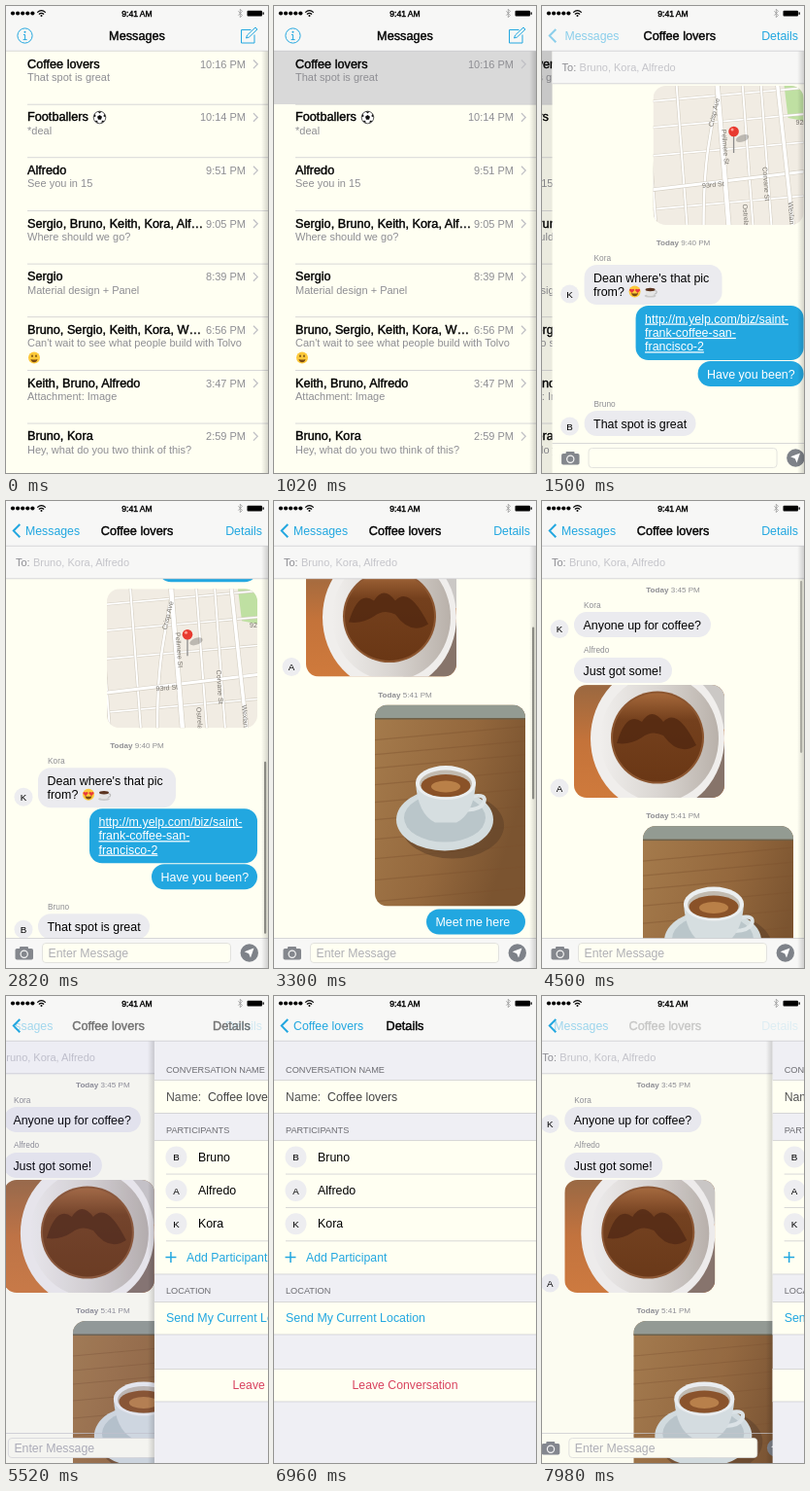
Recreate the animation shown at these times as an HTML page. Size 270 px wide and 480 px high, loop 8000 ms.

```html
<!DOCTYPE html>
<html lang="en">
<head>
<meta charset="utf-8">
<title>Messages</title>
<style>
  html, body { margin: 0; width: 100%; height: 100%; overflow: hidden; background: #fffff2; }
  svg { display: block; width: 100vw; height: 100vh; font-family: "Liberation Sans", Arial, sans-serif; }
  text { white-space: pre; }
</style>
</head>
<body>
<svg id="stage" viewBox="0 0 270 480"></svg>
<script>
const BLUE = '#22a7e0', GRAY = '#8e8e93', LINE = '#c8c7cc', CREAM = '#fffff2', BAR = '#f7f7f6';
const LOOP = 8000, PUSH = 1190, OPEN = 5430, BACK = 7755, BOTTOM = 495;

// ---- drawing helpers -------------------------------------------------
const text = (x, y, s, size = 12.3, fill = '#000', more = '') =>
  `<text x="${x}" y="${y}" font-size="${size}" fill="${fill}" ${more}>${s}</text>`;
const medium = (x, y, s, size = 12.7, more = '') =>
  text(x, y, s, size, '#000', `stroke="#000" stroke-width=".4" ${more}`);
const rect = (x, y, w, h, fill, more = '') =>
  `<rect x="${x}" y="${y}" width="${w}" height="${h}" fill="${fill}" ${more}/>`;
const circle = (x, y, r, fill, more = '') => `<circle cx="${x}" cy="${y}" r="${r}" fill="${fill}" ${more}/>`;
const oval = (x, y, rx, ry, fill, more = '') =>
  `<ellipse cx="${x}" cy="${y}" rx="${rx}" ry="${ry}" fill="${fill}" ${more}/>`;
const path = (d, stroke, w = 1, more = '') =>
  `<path d="${d}" fill="none" stroke="${stroke}" stroke-width="${w}" ${more}/>`;
const shape = (d, fill, more = '') => `<path d="${d}" fill="${fill}" ${more}/>`;
const group = (id, body, more = '') => `<g id="${id}" ${more}>${body}</g>`;
const rule = (y, x = 0) => rect(x, y, 270 - x, .7, LINE);
const gradient = (id, vector, stops) => `<linearGradient id="${id}" ${vector}>` +
  stops.map(([at, color, a = 1]) => `<stop offset="${at}" stop-color="${color}" stop-opacity="${a}"/>`).join('') +
  '</linearGradient>';
const MID = 'text-anchor="middle"', END = 'text-anchor="end"', DOWN = 'x2="0" y2="1"';

const face = (x, y, hearts) => circle(x, y, 6, '#fdc93a') +
  (hearts
    ? [-3, 3].map(d => shape(`M${x + d} ${y + 1.5}l-2.6-2.8q0-2.4 2.6-1 2.6-1.4 2.6 1z`, '#e8383d')).join('')
    : oval(x - 2, y - 1.8, .8, 1.3, '#6b4410') + oval(x + 2, y - 1.8, .8, 1.3, '#6b4410')) +
  shape(`M${x - 3.5} ${y + 1.5}q3.5 1 7 0-.8 3.2-3.5 3.2t-3.5-3.2z`, '#7a4a12');

const cupIcon = (x, y) => oval(x, y + 4.5, 6, 1.6, '#c9c9c9') +
  path(`M${x + 4} ${y - 1}q4 0 2 3l-3 1`, '#bbb', 1.2) +
  shape(`M${x - 5} ${y - 2}h10q0 6-3 6.5h-4q-3-.5-3-6.5z`, '#e4e4e4') + oval(x, y - 2, 5, 1.7, '#5b3420');

const ball = (x, y) => circle(x, y, 6.3, '#fff', 'stroke="#333" stroke-width=".8"') +
  shape(`M${x} ${y - 2.6}l2.5 1.8-1 3h-3l-1-3z`, '#111') +
  [0, 72, 144, 216, 288].map(a =>
    shape(`M${x - 2} ${y - 5.9}h4l-2 1.9z`, '#111', `transform="rotate(${a} ${x} ${y})"`)).join('');

// ---- conversation list -----------------------------------------------
const rows = [
  ['Coffee lovers', 'That spot is great', '10:16 PM'],
  ['Footballers', '*deal', '10:14 PM'],
  ['Alfredo', 'See you in 15', '9:51 PM'],
  ['Sergio, Bruno, Keith, Kora, Alf…', 'Where should we go?', '9:05 PM'],
  ['Sergio', 'Material design + Panel', '8:39 PM'],
  ['Bruno, Sergio, Keith, Kora, W…', "Can't wait to see what people build with Tolvo", '6:56 PM'],
  ['Keith, Bruno, Alfredo', 'Attachment: Image', '3:47 PM'],
  ['Bruno, Kora', 'Hey, what do you two think of this?', '2:59 PM']
];
const listPage = rect(0, 0, 270, 480, CREAM) +
  rect(0, 46, 270, 55, '#d9d9d9', 'id="press"') +
  rows.map(([name, last, time], i) => {
    const y = 46.5 + i * 54.65;
    return medium(22, y + 17.3, name) + text(22, y + 30.5, last, 11, GRAY) +
      text(247, y + 17.2, time, 11, GRAY, END) +
      path(`M255 ${y + 9}l4.2 4.3-4.2 4.3`, '#c0c0c5', 1.3) + rule(y + 54.3, 22);
  }).join('') + ball(96.5, 114.5) + face(29, 361.5);

// ---- chat ------------------------------------------------------------
const bubble = (x, y, w, lines, mine, more = '') =>
  rect(x, y, w, 11 + 15 * lines.length, mine ? BLUE : '#ebebef', 'rx="13"') +
  lines.map((s, i) => text(x + 9.5, y + 17.5 + i * 14.4, s, 12.45, mine ? '#fff' : '#000', more)).join('');
const avatar = (x, y, s, r = 9.5) => circle(x, y, r, '#ededf0') + text(x, y + 3.6, s, 9.8, '#000', MID);
const sender = (y, s) => text(43, y + 3, s, 8.3, GRAY);
const stamp = (y, s) => text(135, y + 3, `<tspan font-weight="bold">Today</tspan> ${s}`, 8.1, GRAY, MID);
const picture = (id, x, y, w, h, body) =>
  `<clipPath id="${id}">${rect(0, 0, w, h, '#000', 'rx="13"')}</clipPath>` +
  `<g transform="translate(${x} ${y})" clip-path="url(#${id})">${body}</g>`;

const topCup = gradient('table', DOWN, [[0, '#9a6840'], [.5, '#c4733a'], [1, '#cf7a3c']]) +
  gradient('china', 'x2="1" y2="0"', [[0, '#f0eeec'], [.5, '#d9d5d1'], [1, '#b9b1aa']]) +
  gradient('crema', DOWN, [[0, '#a5683a'], [.3, '#74401d'], [1, '#6a3715']]) +
  rect(0, 0, 155, 116, 'url(#table)') + shape('M100 116L155 60V116z', '#87746a') +
  shape('M90 0H155V46z', '#cbc8c5') +
  oval(86, 55, 69, 75, '#f0eeec') + oval(88, 55, 61, 65, 'url(#china)') +
  oval(86, 54, 48, 47.5, '#8c5630') + oval(86, 54, 46, 45.5, 'url(#crema)') +
  shape('M44 60Q54 26 70 38 80 22 92 38 106 22 126 62 108 74 92 52 80 46 70 54 58 62 44 60z', '#4f260f', 'opacity=".75"');

const sideCup = gradient('wood', 'x2="1" y2=".4"', [[0, '#a57b4c'], [.6, '#94683d'], [1, '#7b5430']]) +
  rect(0, 0, 155, 207, 'url(#wood)') + rect(0, 0, 155, 14, '#939b92') + rect(0, 13.5, 155, 1.5, '#6d6048') +
  [28, 43, 57, 74, 92, 110, 130, 150, 172, 194].map(y =>
    path(`M0 ${y + 8}L155 ${y - 6}`, '#7c522d', 1.2, 'opacity=".4"')).join('') +
  oval(80, 124, 53, 34, '#5f4228', 'opacity=".6"') + oval(72, 118, 50, 32, '#d3dcde') +
  oval(72, 116, 42, 25, '#bac6ca') + path('M100 94q16-3 12 7-3 6-17 7', '#dde4e6', 4) +
  shape('M42 80Q44 112 62 121H84Q102 112 104 80z', '#d6dee0') + oval(73, 80, 31, 17.5, '#eceff0') +
  oval(73, 81, 27, 14, '#c2bbb0') + oval(73, 83, 25.5, 11.5, '#8a5228') + oval(73, 84, 15, 6, '#b98048');

const road = (d, w) => path(d, '#d5cfc3', w + 1.2) + path(d, '#fff', w);
const label = (x, y, turn, s) =>
  text(0, 0, s, 7, '#77736c', `${MID} transform="translate(${x} ${y}) rotate(${turn})"`);
const map = rect(0, 0, 155, 143, '#f1ece3') + shape('M135 0H155V36L139 33z', '#bfe0a2') +
  [22, 49, 78, 133].map(y => road(`M-2 ${y - 6}L157 ${y - 20}`, 1.6)).join('') +
  [-8, 24, 92, 111].map(x => road(`M${x} -2L${x + 11} 145`, 2)).join('') +
  road('M68 -2Q62 30 57 62T52 145', 2.4) + road('M-2 107L157 88', 3) +
  road('M66 -2L78 145', 4.5) + road('M128 -2L144 145', 3.5) +
  label(65, 28, -76, 'Crisp Ave') + label(72, 63, 85, 'Pellmere St') + label(62, 104, -5, '93rd St') +
  label(114, 101, 86, 'Corvane St') + label(93, 133, 86, 'Ostrela') + label(140, 131, 86, 'Wexlan') +
  text(147, 40, '92nd', 7, '#77736c') +
  oval(92, 54, 7, 3.5, '#000', 'opacity=".22" transform="rotate(-20 92 54)"') +
  path('M83 50V69', '#8b8b8b', 1.3) + circle(83, 47, 5.3, '#e83a30') + circle(81.5, 45, 1.5, '#ff9d92');

const LINK = 'text-decoration="underline"';
const thread = stamp(91, '3:45 PM') + sender(107, 'Kora') + avatar(18, 131.5, 'K') +
  bubble(33, 114, 141, ['Anyone up for coffee?']) +
  sender(153, 'Alfredo') + bubble(33, 161, 101, ['Just got some!']) +
  picture('c1', 33, 189, 155, 116, topCup) + avatar(18, 295, 'A') +
  stamp(323, '5:41 PM') + picture('c2', 104, 334, 155, 207, sideCup) +
  bubble(157, 544, 102, ['Meet me here'], true) + picture('c3', 104, 577, 155, 143, map) +
  stamp(738, '9:40 PM') + sender(754, 'Kora') + avatar(18, 791, 'K') +
  bubble(33, 761, 142, ["Dean where's that pic", 'from?']) + face(85, 788.5, true) + cupIcon(101, 788.5) +
  bubble(86, 803, 173, ['http://m.yelp.com/biz/saint-', 'frank-coffee-san-', 'francisco-2'], true, LINK) +
  bubble(150, 860, 109, ['Have you been?'], true) +
  sender(904, 'Bruno') + avatar(18, 927, 'B') + bubble(33, 911, 115, ['That spot is great']);

const CAMERA = '#84878d';
const camera = rect(9.5, 460, 18.5, 11.5, CAMERA, 'rx="1.8"') + rect(14, 458, 9, 4, CAMERA, 'rx="1"') +
  circle(18.7, 465.7, 4.2, BAR) + circle(18.7, 465.7, 3, CAMERA);
const chatPage = rect(0, 0, 270, 480, CREAM) + group('thread', thread) +
  rect(266, 0, 2.2, 0, '#000', 'id="scroller" rx="1.1" opacity=".4"') +
  rect(0, 46, 270, 34, BAR) + rule(79.5) +
  text(10, 67, 'To:', 11, GRAY) + text(28, 67, 'Bruno, Kora, Alfredo', 11, '#c5c5ca') +
  group('inputBar', rect(0, 449.5, 270, 31, BAR)) + rule(449.3) + camera +
  rect(37.5, 454.5, 194, 20, CREAM, 'rx="3.5" stroke="#dcdcda" stroke-width=".8"') +
  text(43.5, 469, 'Enter Message', 12.3, '#b0b0b5', 'id="hint"') +
  circle(250.8, 464.5, 9.2, '#7e8289') + shape('M255.5 459.5L252 469.5 250.2 465.2 245.6 463.3z', '#fff');

// ---- details ---------------------------------------------------------
const cell = (y, h) => rect(0, y, 270, h, CREAM) + rule(y) + rule(y + h - .4);
const heading = (y, s) => text(12, y + 3.3, s, 9.2, '#6d6d72');
const detailsPage = gradient('edgeShade', 'x2="1" y2="0"', [[0, '#000', 0], [1, '#000', .16]]) +
  rect(-7, 0, 7, 480, 'url(#edgeShade)') + rect(0, 0, 270, 480, '#efeff4') +
  heading(76, 'CONVERSATION NAME') + cell(86, 34.5) +
  text(12, 107.5, 'Name:', 12.3, '#555') + text(55, 107.5, 'Coffee lovers', 12.3, '#444') +
  heading(138, 'PARTICIPANTS') + cell(148, 138) +
  ['Bruno', 'Alfredo', 'Kora'].map((s, i) => {
    const y = 165.5 + i * 34.4;
    return avatar(22.5, y, s[0], 11) + text(45, y + 4, s, 12.4) + rule(y + 17.2, 12);
  }).join('') +
  path('M11.5 268.5h11M17 263v11', BLUE, 1.5) + text(33, 273, 'Add Participant', 12.3, BLUE) +
  heading(303, 'LOCATION') + cell(314, 34) + text(12, 335, 'Send My Current Location', 12.4, BLUE) +
  cell(383, 34) + text(135, 404, 'Leave Conversation', 12.25, '#d9435f', MID);

// ---- bars ------------------------------------------------------------
const status = [0, 1, 2, 3, 4].map(i => circle(7 + i * 5.1, 7.5, 2.1, '#000')).join('') +
  path('M32.2 6.6q4.3-3.8 8.6 0M33.9 8.5q2.6-2.2 5.2 0', '#000', 1.2) + circle(36.5, 10, 1, '#000') +
  medium(135, 10.7, '9:41 AM', 8.6, MID) +
  path('M239.3 5.3l4.2 4.2-2.2 2.2V3.2l2.2 2.2-4.2 4.2', '#9a9a9a', .8) +
  rect(248.5, 4.7, 15.5, 5.8, '#000', 'rx="1"') + rect(264.5, 6.4, 1.3, 2.4, '#000');
const icons = circle(19.5, 30.5, 7.6, 'none', `stroke="${BLUE}" stroke-width="1"`) +
  circle(19.5, 26.8, 1, BLUE) + path('M18 29.5h1.6v5M17.6 34.6h4', BLUE, 1) +
  path('M252.5 24.5H242.5V38H256V29.5M247.5 33l1-3 8.5-8 2 2-8.5 8z', BLUE, 1);
const nav = rect(0, 0, 270, 46, BAR) + rule(45.8) + status +
  group('icons', icons) +
  group('listTitle', medium(135, 35, 'Messages', 12.7, MID)) +
  `<clipPath id="edge">${rect(8, 16, 262, 30, '#000')}</clipPath><g clip-path="url(#edge)">` +
  group('chatBack', text(20, 35, 'Messages', 12.3, BLUE)) +
  group('detailBack', text(20, 35, 'Coffee lovers', 12.3, BLUE)) + '</g>' +
  group('chevron', path('M14.3 24l-6.5 6.6 6.5 6.6', BLUE, 2)) +
  group('chatTitle', medium(135, 35, 'Coffee lovers', 12.7, MID)) +
  group('chatButton', text(264, 35, 'Details', 12.4, BLUE, END)) +
  group('detailTitle', medium(135, 35, 'Details', 12.7, MID));

const shade = (id, color) => rect(0, 46, 270, 434, color, `id="${id}" opacity="0"`);
const stage = document.getElementById('stage');
stage.innerHTML = group('list', listPage + shade('listShade', '#000')) +
  group('chat', chatPage + shade('chatShade', '#7878d8')) + group('details', detailsPage) + nav;
const el = {};
stage.querySelectorAll('[id]').forEach(e => el[e.id] = e);

// ---- motion ----------------------------------------------------------
const ramp = (x, a, b) => Math.min(1, Math.max(0, (x - a) / (b - a)));
const settle = u => u > 0 ? (1 + u) * Math.exp(-u) : 1;
const spring = ms => 1 - settle(ms * .0162);
const move = (id, x, y = 0) => el[id].setAttribute('transform', `translate(${x.toFixed(2)} ${y.toFixed(2)})`);
const fade = (id, a) => el[id].setAttribute('opacity', a.toFixed(3));

// Drag to the top, pull a little past it, then bounce back.
function scrollAt(t) {
  const u = ramp(t, 2758, 3600);
  return t < 3600 ? BOTTOM - (BOTTOM + 26) * u * u * (3 - 2 * u) : -26 * settle((t - 3600) * .0085);
}

function draw(t) {
  const t1 = t - PUSH, t2 = t - OPEN, t3 = t - BACK;
  const p = spring(t1), q = spring(t2) * (1 - spring(t3));
  const leave = (ms, a, b) => t3 < 0 ? 1 - ramp(t2, 0, ms) : ramp(t3, a, b);

  move('list', -81 * p);
  move('chat', 270 * (1 - p) - 81 * q);
  move('details', 270 * (1 - q));
  fade('listShade', .08 * p);
  fade('chatShade', .18 * q);
  fade('press', t < 960 ? 0 : ramp(t, 920, 1020));
  fade('inputBar', p > .999 && q < .001 ? 1 : 0);

  const y = scrollAt(t);
  move('thread', 0, -y);
  el.scroller.setAttribute('y', 82 + Math.max(0, y) / BOTTOM * 189);
  el.scroller.setAttribute('height', 177 + Math.min(0, y));
  fade('scroller', .4 * ramp(t, 2720, 2790) * (1 - ramp(t, 4400, 4700)));
  fade('hint', t < 1840 ? 0 : 1);

  fade('icons', 1 - ramp(t1, 0, 180));
  fade('listTitle', 1 - ramp(t1, 0, 280));
  move('listTitle', -88 * p);
  fade('chevron', ramp(t1, 180, 440));
  fade('chatBack', ramp(t1, 180, 440) * leave(150, 100, 400));
  move('chatBack', 88 * (1 - p) - 64 * q);
  fade('chatTitle', ramp(t1, 0, 150) * leave(200, 180, 420));
  move('chatTitle', 172 * (1 - p) - 68 * q);
  fade('chatButton', ramp(t1, 100, 300) * leave(110, 200, 420));
  fade('detailTitle', ramp(t2, 0, 170) * (1 - ramp(t3, 0, 200)));
  move('detailTitle', 172 * (1 - q));
  fade('detailBack', ramp(t2, 180, 420) * (1 - ramp(t3, 0, 150)));
  move('detailBack', 79 * (1 - q));
}

const start = performance.now();
function tick() {
  draw((performance.now() - start) % LOOP);
  requestAnimationFrame(tick);
}
tick();
</script>
</body>
</html>
```
